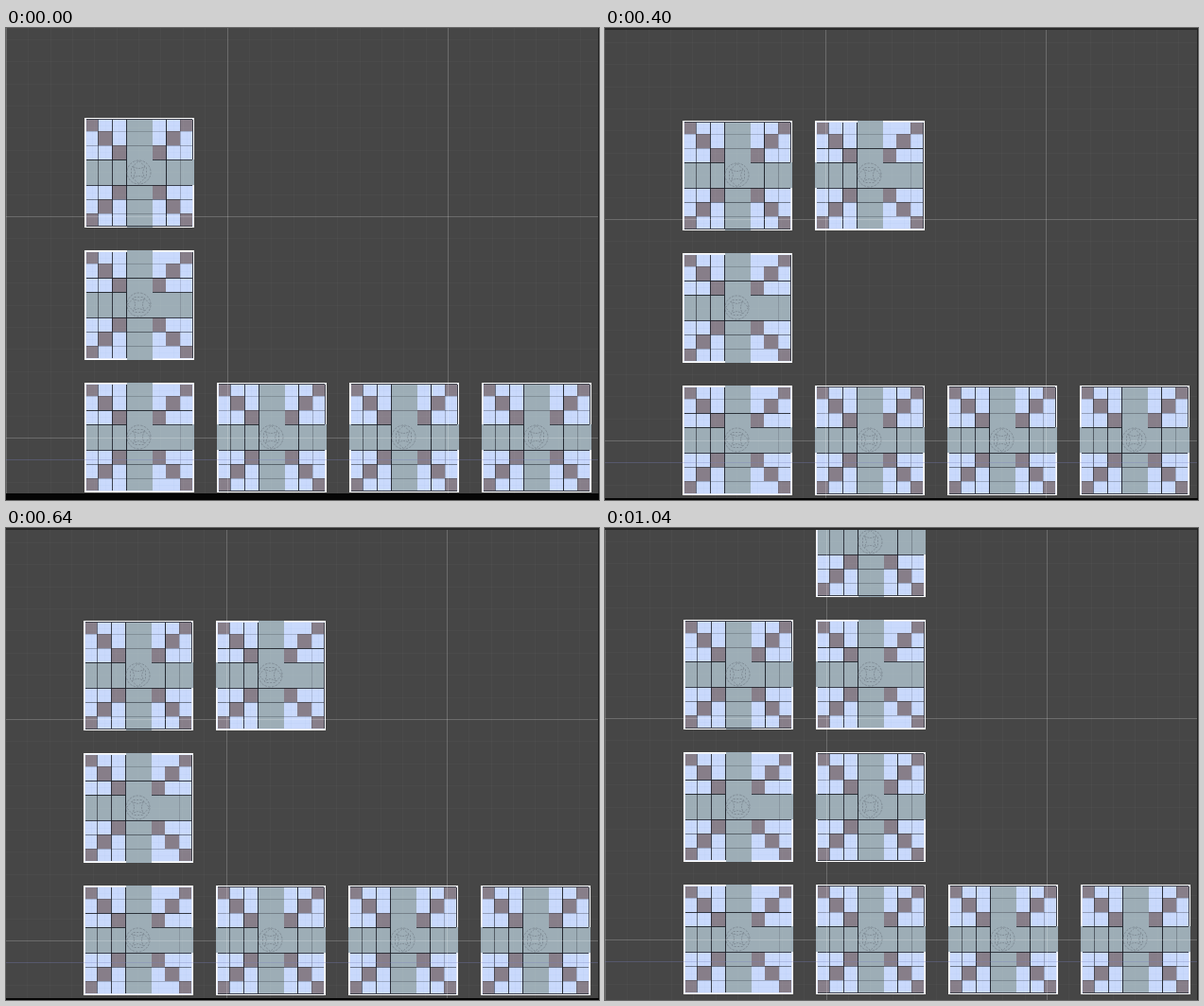
Write an HTML page that moves like this. It is 627 by 499 pixels and loops after 1.2 s.

```html
<!DOCTYPE html>
<html lang="en">
<head>
<meta charset="utf-8">
<title>Room layout</title>
<style>
  html, body { margin: 0; width: 100%; height: 100%; overflow: hidden; background: #464646; }
  svg { display: block; width: 627px; height: 499px; }
</style>
</head>
<body>
<svg id="stage" viewBox="0 0 627 499" shape-rendering="crispEdges"></svg>
<script>
const stage = document.getElementById('stage');
const STEP = 140, SIZE = 116, HOLD = 400;
const EDGES = [2, 14, 29, 44, 71, 86, 101, 114];
const INK = '#171a22', FLOOR = '#9dadb6';

const rect = (x, y, w, h, fill, alpha = 1) =>
  `<rect x="${x}" y="${y}" width="${w}" height="${h}" fill="${fill}" fill-opacity="${alpha}"/>`;
const wallX = (x, alpha, from = 2, to = 114) => rect(x, from, 1, to - from, INK, alpha);
const wallY = (y, alpha, from = 2, to = 114) => rect(from, y, to - from, 1, INK, alpha);

// Each room: column, row, open sides, turned layout.
const bottom = [[0, 2, 'TR', true], [1, 2, 'RL'], [2, 2, 'RL'], [3, 2, 'RL']];
const upper = [0, 0, 'RB'];
const middle = [0, 1, 'TB', true];
const corner = [1, 0, 'TL', true];
const views = [
  { x: 83, y: 95, top: 0, foot: 492, rooms: [upper, middle, ...bottom] },
  { x: 82, y: 98, top: 2, foot: 497, rooms: [upper, corner, middle, ...bottom] },
  { x: 83, y: 97, top: 1.5, foot: 499,
    rooms: [[1, -1, 'RB'], upper, corner, [0, 1, 'TRB', true], [1, 1, 'RL'], ...bottom] }
];

function emblem(turned) {
  return `<g fill="none" stroke="#68707a" stroke-width=".7" opacity=".75" shape-rendering="auto"
    transform="translate(57.5 57.5) rotate(${turned ? 90 : 0})">
    <circle r="12.5" stroke-dasharray="2.5 1.2"/>
    <path d="M-6-6Q0-2 6-6M-6 6Q0 2 6 6M-6-6L-4 0L-6 6M6-6L4 0L6 6" stroke-dasharray="2 1"/>
    <path d="M0-12L8-5V5L0 12L-8 5V-5Z" stroke-dasharray="2 1.5"/></g>`;
}

function room(x, y, open, turned) {
  const has = side => open.includes(side);
  let s = rect(0, 0, SIZE, SIZE, '#fff') + rect(1, 1, 114, 114, '#e6edfd') + rect(2, 2, 112, 112, '#c9d9fc');

  // Faint tile seams
  for (const p of [8, 22, 36, 79, 94, 108])
    s += rect(p, 2, 1, 112, '#b5c8ee', .2) + rect(2, p, 112, 1, '#b5c8ee', .2);

  // Diagonal blocks
  for (let i = 0; i < 7; i++) {
    if (i === 3) continue;
    for (const j of [i, 6 - i])
      s += rect(EDGES[i], EDGES[j], EDGES[i + 1] - EDGES[i], EDGES[j + 1] - EDGES[j], '#877e89');
  }

  // Crossing corridors
  const left = has('L') ? 0 : 2, top = has('T') ? 0 : 2;
  const right = has('R') ? SIZE : 114, low = has('B') ? SIZE : 114;
  s += rect(left, 44, right - left, 27, FLOOR) + rect(45, top, 27, low - top, FLOOR);

  // Walls run on across the corridors
  s += wallX(14, .55) + wallX(29, .8) + wallX(44, .9);
  s += wallY(14, .2) + wallY(44, .85, 2, 44) + wallY(44, .75, 72);
  s += wallY(71, .8) + wallY(86, .5) + wallY(101, .25);
  if (turned) {
    s += wallY(29, .85) + wallX(101, .15);
    if (!has('R')) s += wallX(114, .8);
  } else {
    s += wallY(29, .3) + wallX(86, .9) + wallX(101, .25);
    s += wallY(1, .8) + wallY(114, .8) + wallX(114, .8, 2, 44);
  }
  return `<g transform="translate(${x} ${y})">${s}${emblem(turned)}</g>`;
}

function grid(x0, y0) {
  let s = '';
  for (let i = 0; i < 28; i++) {
    const alpha = i % 10 ? .018 : .2;
    s += rect(Math.round(x0 + i * 23.35), 0, 1, 499, '#fff', alpha);
    s += rect(0, Math.round(y0 + (i - 10) * 23.4), 627, 1, '#fff', alpha);
  }
  return s + rect(0, y0 + 257, 627, 1, '#7077b8', .3);
}

function scene({ x, y, top, foot, rooms }) {
  let s = rect(0, 0, 627, 499, '#464646');
  for (const [col, row, open, turned] of rooms)
    s += room(x + col * STEP, y + row * STEP, open, turned);
  s += grid(x - 83, y + 104);
  s += rect(0, 0, 627, top, '#292929') + rect(626, 0, 1, 499, '#202020');
  return s + rect(0, foot, 627, 499 - foot, '#050505');
}

const scenes = views.map(scene);
let shown = -1;

function update(time) {
  const index = Math.floor(time / HOLD) % scenes.length;
  if (index !== shown) stage.innerHTML = scenes[shown = index];
}

const start = performance.now();
function tick() {
  update(performance.now() - start);
  requestAnimationFrame(tick);
}
tick();
</script>
</body>
</html>
```
